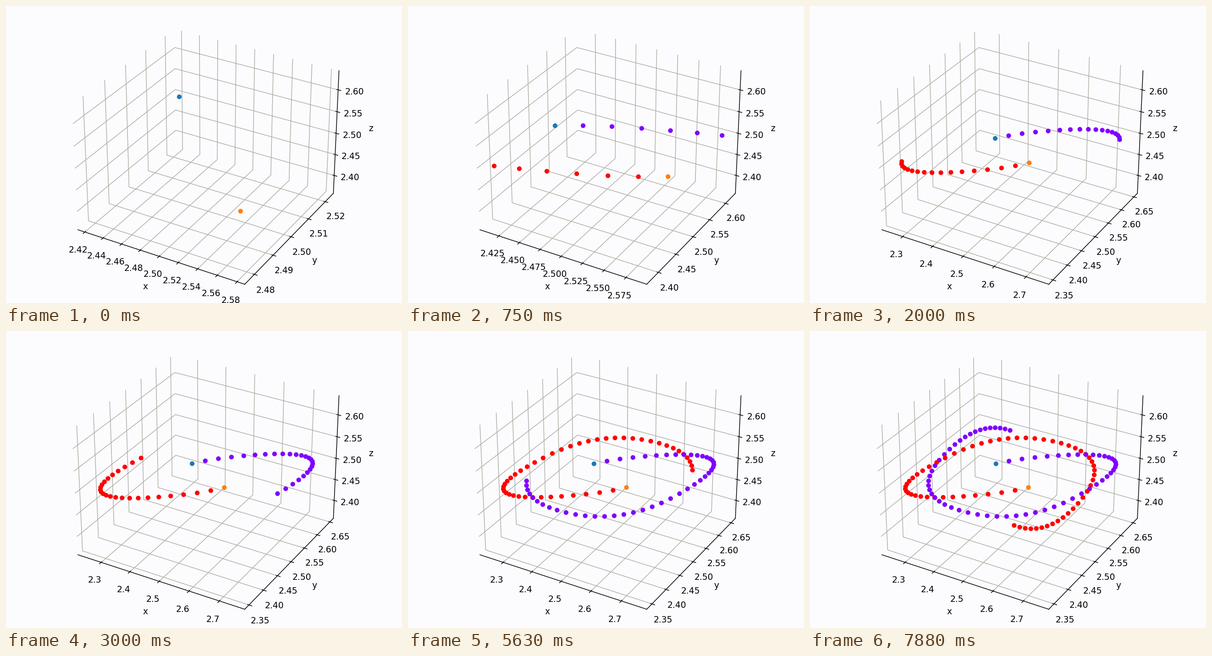
Write a matplotlib script that moves like this. It is 864x648 px and loops after 8000 ms.

```python
import numpy as np
import matplotlib.pyplot as plt
from matplotlib.animation import FuncAnimation

FRAMES = 64
STEP_MS = 125
MID = 2.5
PULL = 0.0018            # constant pull towards the middle, per axis
MARGIN = 1.1 * 25 / 24   # data margin times the view margin
PAPER = "#fcfcfe"
BLUE, ORANGE = "#1f77b4", "#ff7f0e"
VIOLET, RED = "#7f00ff", "#ff0000"

# Moments at which each coordinate passes the middle
X_ZEROS = [-30.25, 2.81, 35.90, 68.95]
Y_ZEROS = [-1.0, 24.25, 49.79, 75.0]


def swing(t, zeros, sign):
    """Chain of parabolic arcs, alternating in sign between the zeros."""
    out = np.zeros_like(t)
    for a, b in zip(zeros, zeros[1:]):
        inside = (t >= a) & (t < b)
        out[inside] = sign * PULL / 2 * ((t - a) * (b - t))[inside]
        sign = -sign
    return out


steps = np.arange(FRAMES, dtype=float)
dx = swing(steps, X_ZEROS, -1)
dy = swing(steps, Y_ZEROS, 1)

plt.rcParams["font.family"] = "DejaVu Sans"
plt.rcParams["grid.color"] = "#b0b0a8"

fig = plt.figure(figsize=(6.4, 4.8), dpi=135, facecolor=PAPER)
ax = fig.add_axes([0, 0, 1, 1], projection="3d")
ax.set_facecolor(PAPER)
for axis in (ax.xaxis, ax.yaxis, ax.zaxis):
    axis.set_pane_color((1, 1, 1, 0))
ax.set_xlabel("x")
ax.set_ylabel("y")
ax.set_zlabel("z")


def limits(half):
    return MID - half * MARGIN, MID + half * MARGIN


def draw(i):
    for old in list(ax.collections):
        old.remove()
    x, y = dx[:i + 1], dy[:i + 1]
    # The two bodies mirror each other through the middle
    xs = MID + np.concatenate([x, -x])
    ys = MID + np.concatenate([y, -y])
    colors = [BLUE] + [VIOLET] * i + [ORANGE] + [RED] * i
    ax.scatter(xs, ys, np.full(len(xs), MID), s=20, c=colors, depthshade=False)
    ax.set_xlim(*limits(np.abs(x).max()))
    ax.set_ylim(*limits(np.abs(y).max()))
    ax.set_zlim(*limits(0.125))
    return []


anim = FuncAnimation(fig, draw, frames=FRAMES, interval=STEP_MS,
                     init_func=lambda: draw(0), repeat=True, blit=False)
plt.show()
```
